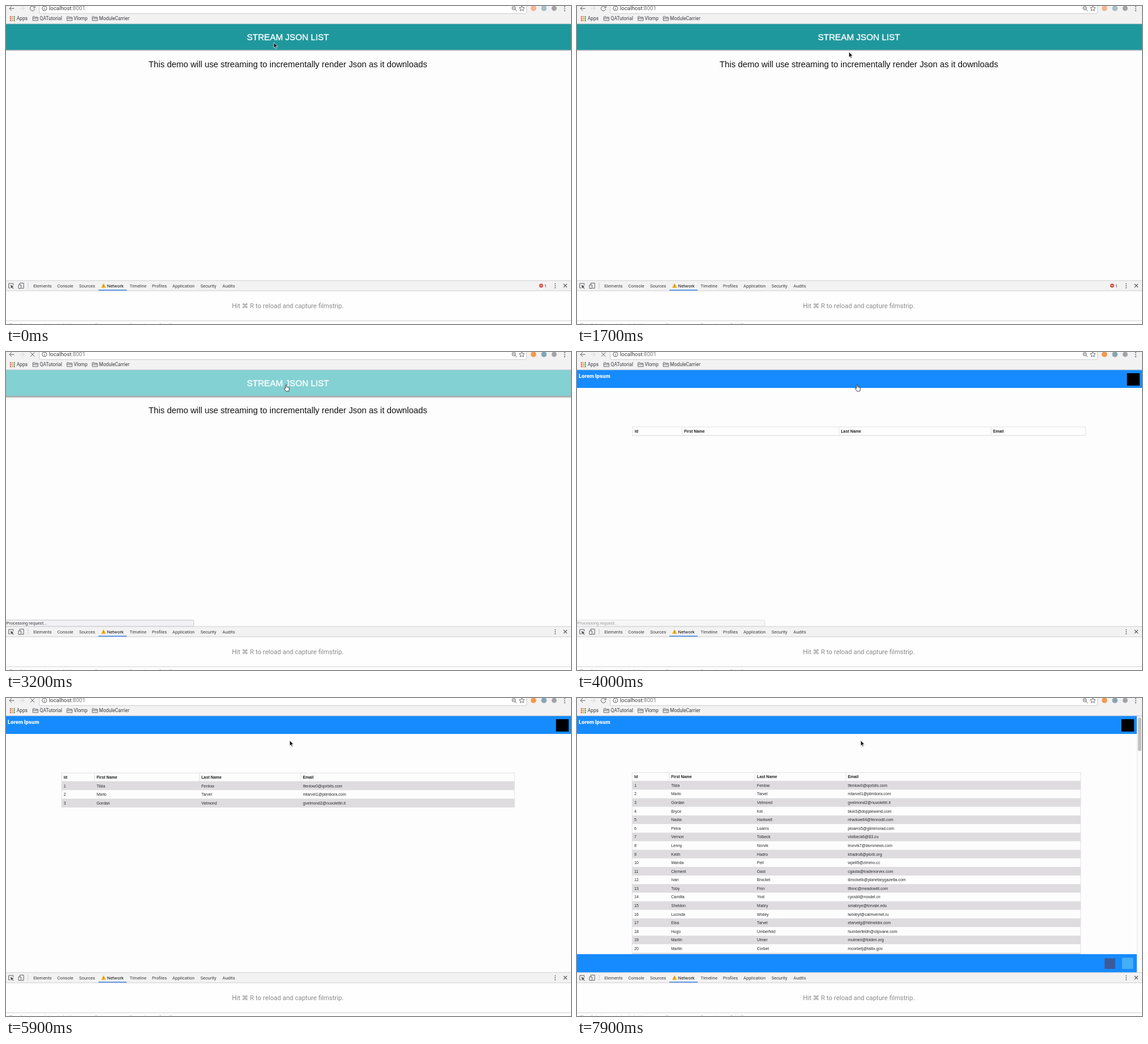
Recreate the animation shown at these times as an HTML page. Size 960 px wide and 540 px high, loop 8000 ms.

```html
<!DOCTYPE html>
<html lang="en">
<head>
<meta charset="utf-8">
<title>Streaming list</title>
<style>
  html, body { margin: 0; width: 100%; height: 100%; overflow: hidden; background: #fdfdfd; }
  svg { display: block; width: 960px; height: 540px; }
  text { white-space: pre; }
  .ui { font-family: Roboto, sans-serif; fill: #3c3c3e; }
  .page { font-family: "Liberation Sans", Arial, sans-serif; }
  .cell { font-size: 6.75px; fill: #2b2b2e; }
  .head { font-weight: bold; fill: #1c1c1e; }
  .line { fill: none; stroke: #606064; stroke-width: 1; }

  .bar { animation: bar 8s infinite; }
  @keyframes bar {
    0%, 25.7% { fill: #1f989d; }
    28.2%, 100% { fill: #20abb0; }
  }
  .lift { animation: lift 8s infinite; }
  @keyframes lift {
    0%, 25.7% { opacity: 0; }
    28.2%, 100% { opacity: 1; }
  }
  .ripple { animation: ripple 8s infinite; }
  @keyframes ripple {
    0%, 30.45% { transform: scale(0); opacity: 0; animation-timing-function: ease-out; }
    39.2%, 100% { transform: scale(1); opacity: 1; }
  }
  .status { animation: status 8s linear infinite; }
  @keyframes status {
    0%, 34.9% { opacity: 0; }
    35.6%, 48.6% { opacity: 1; }
    51.5%, 100% { opacity: 0; }
  }
  .pointer { animation: pointer 8s ease-in-out infinite; }
  @keyframes pointer {
    0% { transform: translate(455px, 62px); }
    9%, 23.7% { transform: translate(462px, 78px); }
    28.2%, 58.7% { transform: translate(476px, 55.5px); }
    63%, 100% { transform: translate(482px, 72px); }
  }
</style>
</head>
<body>
<svg viewBox="0 0 960 540">
  <defs>
    <clipPath id="barClip"><rect y="30" width="960" height="44.5"/></clipPath>
    <linearGradient id="shade" x2="0" y2="1">
      <stop stop-color="#000" stop-opacity=".36"/>
      <stop offset="1" stop-color="#000" stop-opacity="0"/>
    </linearGradient>
    <path id="folder" d="M.5 7.6V1.2Q.5.5 1.2.5H3.6L4.6 1.7H8.8Q9.5 1.7 9.5 2.4V7.6ZM.5 3.4H9.5" fill="#dcdcde" stroke="#6c6c70" stroke-width=".9"/>
  </defs>

  <rect width="960" height="540" fill="#fdfdfd"/>

  <!-- First page -->
  <g data-on="0 3550">
    <rect y="74" width="960" height="3" fill="url(#shade)"/>
    <rect class="lift" y="74" width="960" height="5" fill="url(#shade)"/>
    <rect class="bar" y="30" width="960" height="44.5"/>
    <g clip-path="url(#barClip)">
      <g transform="translate(476 60)"><circle class="ripple" r="1440" fill="#fff" fill-opacity=".45"/></g>
    </g>
    <g class="page" text-anchor="middle">
      <text x="479" y="57.9" font-size="14.7" fill="#fff" stroke="#fff" stroke-width=".35">STREAM JSON LIST</text>
      <text x="479" y="103.6" font-size="14.4" fill="#111">This demo will use streaming to incrementally render Json as it downloads</text>
    </g>
  </g>

  <!-- Second page -->
  <g data-on="3550 8000">
    <rect y="30" width="960" height="31" fill="#168bff"/>
    <text x="3" y="43.8" font-family="Inter, sans-serif" font-weight="800" font-size="8.4" fill="#fff">Lorem Ipsum</text>
  </g>
  <rect data-on="3550 6100" x="934.5" y="36" width="21.5" height="21"/>
  <g id="tables"></g>
  <g data-on="6100 8000">
    <rect x="925" y="36" width="21.5" height="21"/>
    <rect y="435" width="952" height="31" fill="#168bff"/>
    <rect x="896.5" y="442" width="18" height="18" fill="#3d5a98"/>
    <rect x="926" y="441" width="19" height="19" fill="#45aef5"/>
    <rect x="951.5" y="30.5" width="8.5" height="436" fill="#fafafa"/>
    <path d="M951.7 30.5V466" stroke="#e4e4e4" stroke-width=".8"/>
    <rect x="953.2" y="33" width="5.6" height="57" rx="2.8" fill="#c1c1c1"/>
  </g>

  <!-- Browser toolbar -->
  <g class="ui">
    <rect width="960" height="30.3" fill="#f3f2f3"/>
    <path d="M0 30.2H960" stroke="#c4c4c6" stroke-width=".8"/>
    <rect x="56.5" y="-8" width="828" height="20.8" rx="2" fill="#fff" stroke="#c3c3c5" stroke-width=".8"/>
    <path class="line" d="M14 4.2H6M9.6.4 5.8 4.2 9.6 8"/>
    <path class="line" d="M23 4.2H31M27.4.4 31.2 4.2 27.4 8" style="stroke:#d4d4d6"/>
    <path class="line" d="M48 1.6A4 4 0 1 0 48.8 5M49.2 0V3H46.2" data-on="0 2450"/>
    <path class="line" d="M48 1.6A4 4 0 1 0 48.8 5M49.2 0V3H46.2" data-on="6100 8000"/>
    <path class="line" d="M41.4.6 48.6 7.8M48.6.6 41.4 7.8" data-on="2450 6100"/>
    <circle class="line" cx="65.3" cy="4" r="3.9" stroke-width=".8"/>
    <path class="line" d="M65.3 3.6V6.4M65.3 1.7V2.6"/>
    <text x="73" y="7.2" font-size="9.4">localhost<tspan fill="#77777a">:8001</tspan></text>
    <circle class="line" cx="862.8" cy="3.6" r="2.9"/>
    <path class="line" d="M865 5.8 867.8 8.6M861.4 3.6H864.2"/>
    <path class="line" d="M876.5-.4 877.8 2.6 881 2.9 878.6 5 879.3 8.2 876.5 6.5 873.7 8.2 874.4 5 872 2.9 875.2 2.6Z" style="stroke-width:.9"/>
    <g data-on="0 2450">
      <circle cx="896.3" cy="4" r="4.7" fill="#f4b48c"/>
      <circle cx="914" cy="4" r="4.7" fill="#a9bcc6"/>
    </g>
    <g data-on="2450 8000">
      <circle cx="896.3" cy="4" r="4.7" fill="#f19a4e"/>
      <circle cx="914" cy="4" r="4.7" fill="#86a5b2"/>
    </g>
    <circle cx="931.4" cy="4" r="4.4" fill="#a3a3a6"/>
    <path d="M949.3.6V9" stroke="#5c5c60" stroke-width="1.7" stroke-dasharray="1.7 1.6"/>
    <g id="apps"></g>
    <g font-size="8.2">
      <text x="18" y="24.4">Apps</text>
      <use href="#folder" x="45" y="17.2"/><text x="57.3" y="24.4">QATutorial</text>
      <use href="#folder" x="103" y="17.2"/><text x="115" y="24.4">Vlomp</text>
      <use href="#folder" x="146" y="17.2"/><text x="158" y="24.4">ModuleCarrier</text>
    </g>
  </g>

  <g class="status ui">
    <path d="M-1 466V455.2H317Q319 455.2 319 457.2V466Z" fill="#f2f1f3" stroke="#bfbfc2" stroke-width=".9"/>
    <text x=".6" y="462.8" font-size="7.35">Processing request...</text>
  </g>

  <!-- Developer panel -->
  <g class="ui">
    <rect y="466" width="960" height="18" fill="#f3f2f3"/>
    <rect y="484" width="960" height="56" fill="#fefefe"/>
    <path d="M0 466.2H960M0 483.7H960M0 534.5H960" stroke="#cfcfd1" stroke-width=".9"/>
    <path d="M37.5 470V480" stroke="#cfcfd1"/>
    <path class="line" d="M12.3 474V471.2H4.6V478.8H7.4"/>
    <path d="M7.5 473.8 13 476 10.9 477.1 13 479.4 12.2 480.2 10 478 8.9 479.6Z" fill="#505054"/>
    <path class="line" d="M23.4 473V470.5H30V479.3H26.5M21.2 473.6H25.6V479.6H21.2Z"/>
    <g id="tabs" font-size="7.5"></g>
    <path d="M157 482.6H205" stroke="#4285e8" stroke-width="1.5"/>
    <path d="M165.8 471.4 169.6 478.3H162Z" fill="#f3b51c" stroke="#f3b51c" stroke-width=".6" stroke-linejoin="round"/>
    <path d="M165.8 473.6V476M165.8 476.8V477.6" stroke="#7a5a10" stroke-width=".8"/>
    <g data-on="0 2800">
      <circle cx="909.3" cy="474.9" r="3.3" fill="#d9453a"/>
      <path d="M908 473.6 910.6 476.2M910.6 473.6 908 476.2" stroke="#fff" stroke-width=".8"/>
      <text x="914.6" y="477.6" font-size="7.5">1</text>
    </g>
    <path d="M933.2 471V480" stroke="#5c5c60" stroke-width="1.6" stroke-dasharray="1.6 1.7"/>
    <path class="line" d="M947.4 472 953.2 477.8M953.2 472 947.4 477.8" style="stroke-width:1.2"/>
    <text x="384" y="513.2" font-size="11" fill="#8b8b8e" style="font-family:Roboto,'DejaVu Sans',sans-serif">Hit ⌘ R to reload and capture filmstrip.</text>
    <circle class="line" cx="8" cy="542.6" r="3.6" style="stroke:#bbb"/>
    <g font-size="7.5" fill="#bbb">
      <text x="23" y="544.4">Select a row below to list it</text>
      <text x="151" y="544.4">Type</text>
      <text x="210" y="544.4">Request</text>
      <text x="260" y="544.4">Total F</text>
    </g>
  </g>

  <g class="pointer">
    <path d="M0 0V9.3L2.1 7.4 3.6 10.7 5.1 10 3.6 6.8H6.6Z" fill="#111" stroke="#fff" stroke-width=".7" data-on="0 2060 4700 8000"/>
    <path d="M-1.1 6.5V.9Q-1.1-.1-.1-.1T.9.9V4Q2 3.4 2.5 4.3 3.6 3.8 4 4.8 5.3 4.5 5.3 5.9V8Q5.3 9.4 4.4 11.1H-.3Q-1.6 9.2-3.1 7.2-3.6 6-2.7 5.7-1.9 5.5-1.1 6.5Z" fill="#fff" stroke="#222" stroke-width=".9" data-on="2060 4700"/>
  </g>
</svg>

<script>
const LOOP = 8000;
const ROW = 14.58;
const $ = id => document.getElementById(id);

const people = `Tilda Fenlow qorbits.com
Marlo Tarvel plimbora.com
Gordan Velmond nuvolettri.it
Bryce Kel dopplewend.com
Nadia Harkwell fennodil.com
Petra Loams glimmorad.com
Vernon Tolbeck 83.zu
Lenny Norvik tavronews.com
Keith Hadro plorb.org
Wanda Pell zimmo.cc
Clement Gast tradenorvex.com
Ivan Brockel planetarygazetta.com
Toby Finn meadowtil.com
Camilla Yost noxdel.cn
Sheldon Mabry torvale.edu
Lucinda Wixley calmvernet.ru
Elsa Tarvel hitmeldor.com
Hugo Umberfeld clipvane.com
Martin Ulmer folden.org
Martin Corbet tallix.gov`.split("\n").map((entry, i) => {
  const [first, last, host] = entry.split(" ");
  const mail = (first[0] + last).toLowerCase() + i.toString(36) + "@" + host;
  return [i + 1, first, last, mail];
});

const cells = (values, cols, y, cls) => values.map((v, i) =>
  `<text class="cell ${cls}" x="${cols[i] + 3.5}" y="${y}">${v}</text>`).join("");

function table(from, to, count, cols, right, top) {
  const left = cols[0], width = right - left;
  let out = "";
  for (let i = 1; i <= count; i++) {
    const y = top + i * ROW;
    if (i % 2) out += `<rect x="${left}" y="${y}" width="${width}" height="${ROW}" fill="#dedcdf"/>`;
    if (people[i - 1]) out += cells(people[i - 1], cols, y + 9.8, "");
  }
  const rules = cols.slice(1).map(x => `M${x} ${top}v${ROW}`).join("");
  out += `<path d="${rules}M${left} ${top + ROW}H${right}" stroke="#dcdcde" stroke-width=".8"/>
    <rect x="${left}" y="${top}" width="${width}" height="${(count + 1) * ROW}" fill="none" stroke="#dcdcde" stroke-width=".8"/>`;
  out += cells(["Id", "First Name", "Last Name", "Email"], cols, top + 9.8, "head");
  return `<g class="page" data-on="${from} ${to}">${out}</g>`;
}

// Columns reflow as longer addresses arrive
$("tables").innerHTML =
  table(3550, 4700, 0, [94.5, 178.5, 445, 703.5], 864, 127.2) +
  table(4700, 5150, 1, [94.5, 154, 348, 537], 864, 127.2) +
  table(5150, 5600, 2, [94.5, 151.5, 335, 514], 864, 127.2) +
  table(5600, 6100, 3, [94.5, 150.5, 328.5, 501], 864, 127.2) +
  table(6100, 8000, 21, [93.8, 156.5, 302.3, 456.8], 855.8, 126.5);

const tabs = { Elements: 46.5, Console: 87, Sources: 124.3, Network: 171.8, Timeline: 210,
  Profiles: 248, Application: 282.8, Security: 330.5, Audits: 367.8 };
$("tabs").innerHTML = Object.entries(tabs).map(([name, x]) =>
  `<text x="${x}" y="477.7"${name === "Network" ? ' fill="#111"' : ""}>${name}</text>`).join("");

const dots = ["#d9574a", "#e0a13a", "#4f9a62", "#4a83d0"];
for (let i = 0; i < 9; i++) {
  $("apps").innerHTML += `<rect x="${6.6 + i % 3 * 3.2}" y="${17.2 + (i / 3 | 0) * 3.2}" width="2.2" height="2.2" fill="${dots[(i + (i / 3 | 0)) % 4]}"/>`;
}

// data-on lists pairs of start and end times in ms
let rules = "";
document.querySelectorAll("[data-on]").forEach((el, n) => {
  const steps = el.dataset.on.split(" ").map((ms, i) =>
    +ms < LOOP ? `${ms / LOOP * 100}%{opacity:${1 - i % 2}}` : "").join("");
  rules += `@keyframes on${n}{0%,100%{opacity:0}${steps}}`;
  el.style.animation = `on${n} ${LOOP}ms step-end infinite`;
});
document.head.appendChild(document.createElement("style")).textContent = rules;
</script>
</body>
</html>
```
